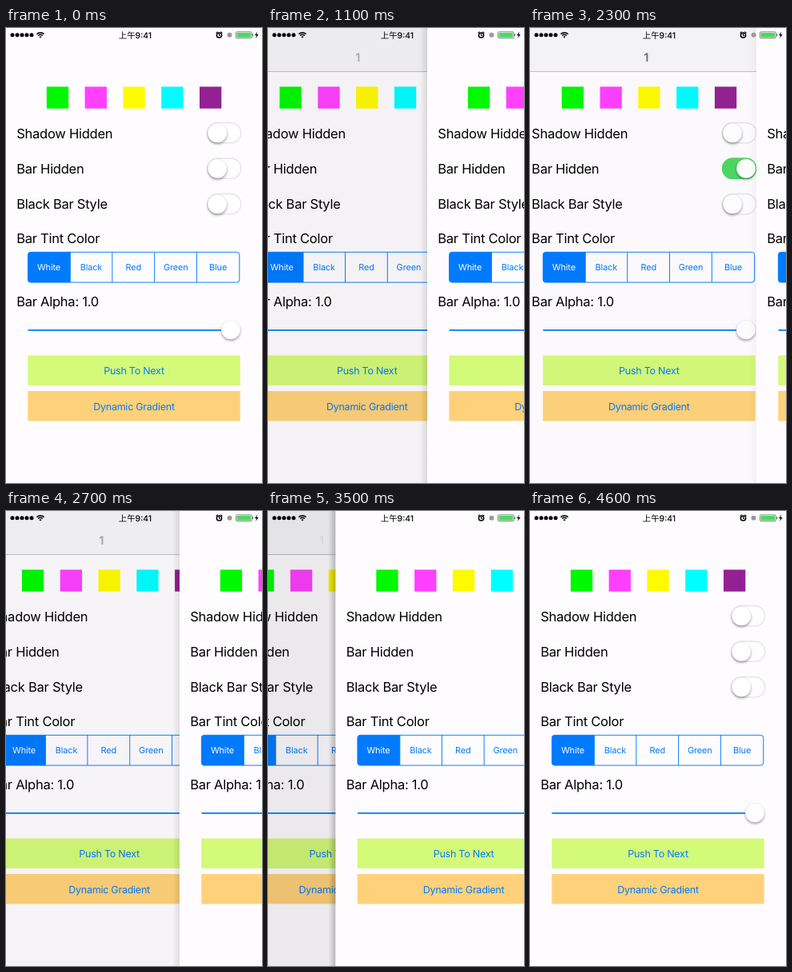
Recreate the animation shown at these times as an HTML page. Size 320 px wide and 569 px high, loop 4700 ms.

```html
<!DOCTYPE html>
<html lang="en">
<head>
<meta charset="utf-8">
<title>Swipe back</title>
<style>
  html, body { margin: 0; height: 100%; overflow: hidden; background: #fefcff; }
  svg { display: block; width: 100vw; height: 100vh; }
  text { font-family: Inter, "Noto Sans CJK SC", "Noto Sans CJK", sans-serif; text-rendering: geometricPrecision; }
  .label { font-size: 16.5px; letter-spacing: -.015em; }
  .mid { text-anchor: middle; fill: #007aff; }
  .seg { font-size: 10.9px; letter-spacing: -.01em; }
  .button { font-size: 12.5px; letter-spacing: -.02em; }
  .thumb { fill: #fff; stroke: #0002; stroke-width: .4; filter: drop-shadow(0 2px 1.8px #0005); }
  .line { fill: none; stroke: #000; stroke-width: 1.5; }
</style>
</head>
<body>
<svg viewBox="0 0 320 569" preserveAspectRatio="none">
  <defs>
    <linearGradient id="fade"><stop stop-color="#000" stop-opacity="0"/><stop offset="1" stop-color="#000" stop-opacity=".3"/></linearGradient>
  </defs>
  <g id="under"></g>
  <rect id="dim" width="320" height="569"/>
  <text id="title" y="41.5" text-anchor="middle" font-size="14.5" font-weight="600">1</text>
  <g id="top"></g>
  <g id="status">
    <path d="M8 8.7h24.1" stroke="#000" stroke-width="5" stroke-linecap="round" stroke-dasharray="0 6"/>
    <path class="line" d="M38.4 7.6a6.6 6.6 0 0 1 9.2 0M40.2 9.5a4 4 0 0 1 5.6 0"/>
    <path d="M41.4 10.9a2.3 2.3 0 0 1 3.2 0L43 12.6z"/>
    <text x="161.5" y="12.6" text-anchor="middle" font-size="10.4" font-weight="500">上午9:41</text>
    <circle class="line" cx="266.5" cy="9" r="3.1"/>
    <path class="line" d="M262.6 6.4l2-1.8M270.4 6.4l-2-1.8M266.5 7v2.2h1.5" style="stroke-width:1.1"/>
    <circle cx="279.5" cy="8.8" r="3" fill="#9a999b"/>
    <rect x="287.4" y="4.8" width="20" height="8" rx="1.6" fill="none" stroke="#555" stroke-width=".7"/>
    <rect x="288.5" y="5.9" width="17.8" height="5.8" rx=".7" fill="#4cd964"/>
    <path d="M308.2 7.3a1.6 1.6 0 0 1 0 3z" fill="#555"/>
    <path d="M314.3 4.6l-3.4 4.7h2.2l-1 3.8 3.5-5h-2.3z"/>
  </g>
</svg>
<script>
const el = id => document.getElementById(id);
const each = (list, draw) => list.map(draw).join('');

const toggle = (y, on) => `
  <rect x="251.5" y="${y - 12.7}" width="42.3" height="25.4" rx="12.7"
    fill="${on ? '#4cd964' : '#fefdff'}" stroke="${on ? '#4cd964' : '#e4e3e5'}" stroke-width="1.3"/>
  <circle class="thumb" cx="${on ? 281.2 : 264.2}" cy="${y}" r="12"/>`;

const button = (y, color, name) => `
  <rect x="27.3" y="${y}" width="265.4" height="37.4" fill="${color}"/>
  <text class="mid button" x="160" y="${y + 23.6}">${name}</text>`;

const page = barHidden => `
  <rect width="320" height="569" fill="#fefcff"/>
  ${each(['#00f900', '#ff40ff', '#fffb00', '#00fdff', '#942193'], (color, i) =>
    `<rect x="${50.8 + 47.8 * i}" y="73.4" width="27.3" height="27.3" fill="${color}"/>`)}
  ${each([['Shadow Hidden', 137.5], ['Bar Hidden', 182], ['Black Bar Style', 226.3],
    ['Bar Tint Color', 269], ['Bar Alpha: 1.0', 347.5]], ([name, y]) =>
    `<text class="label" x="13.2" y="${y}">${name}</text>`)}
  ${toggle(131.2)}${toggle(175.7, barHidden)}${toggle(220.2)}
  <path d="M80.3 280.3H30.8a3.4 3.4 0 0 0-3.4 3.4v31a3.4 3.4 0 0 0 3.4 3.4h49.5z" fill="#007aff"/>
  <rect x="27.4" y="280.3" width="264.4" height="37.8" rx="3.4" fill="none" stroke="#007aff" stroke-width=".95"/>
  <path d="M80.3 280v38m52.5-38v38m52.8-38v38m52.8-38v38" stroke="#007aff" stroke-width=".95"/>
  ${each(['White', 'Black', 'Red', 'Green', 'Blue'], (name, i) =>
    `<text class="mid seg" x="${53.5 + 52.9 * i}" y="303.2"${i ? '' : ' style="fill:#fff"'}>${name}</text>`)}
  <path d="M27.5 377.9H281" stroke="#007aff" stroke-width="1.8"/>
  <circle class="thumb" cx="281" cy="377.3" r="12"/>
  ${button(409.5, '#d3fa79', 'Push To Next')}
  ${button(454, '#ffd17a', 'Dynamic Gradient')}`;

el('under').innerHTML = page(true) + `
  <rect width="320" height="54.5" fill="#f6f5f7"/>
  <rect y="54.2" width="320" height=".8" fill="#b4b3b5"/>`;
el('top').innerHTML = '<rect id="shadow" x="-9" width="9" height="569" fill="url(#fade)"/>' + page(false);

// Finger path: [time in ms, left edge of the top page]
const path = [[0, 0], [700, 114.5], [1500, 264], [1900, 283], [2200, 284.5],
  [2300, 283], [3100, 130], [3900, 49], [4600, 0], [4700, 0]];
const secant = i => (path[i + 1][1] - path[i][1]) / (path[i + 1][0] - path[i][0]);

// Monotone tangent: harmonic mean of the neighbouring secants
function slope(i) {
  if (!i || i === path.length - 1) return 0;
  const a = secant(i - 1), b = secant(i);
  return a * b > 0 ? 2 * a * b / (a + b) : 0;
}

function edgeAt(t) {
  const i = path.findIndex((_, k) => t < path[k + 1][0]);
  const [t0, x0] = path[i], [t1, x1] = path[i + 1];
  const h = t1 - t0, u = (t - t0) / h, v = 1 - u;
  return x0 * v * v * (1 + 2 * u) + x1 * u * u * (3 - 2 * u)
    + h * u * v * (slope(i) * v - slope(i + 1) * u);
}

function draw(now) {
  const x = edgeAt(Math.floor(now % 4700 / 100) * 100);
  const p = x / 320, rest = 320 - x;
  el('under').setAttribute('transform', `translate(${-.3 * rest})`);
  el('top').setAttribute('transform', `translate(${x})`);
  el('dim').setAttribute('opacity', .1 * (1 - p));
  el('shadow').setAttribute('opacity', 1 - p);
  el('title').setAttribute('x', 160 - .395 * rest);
  el('title').setAttribute('opacity', .7 * p * p);
}

const start = performance.now();
function tick() {
  draw(performance.now() - start);
  requestAnimationFrame(tick);
}
tick();
</script>
</body>
</html>
```
